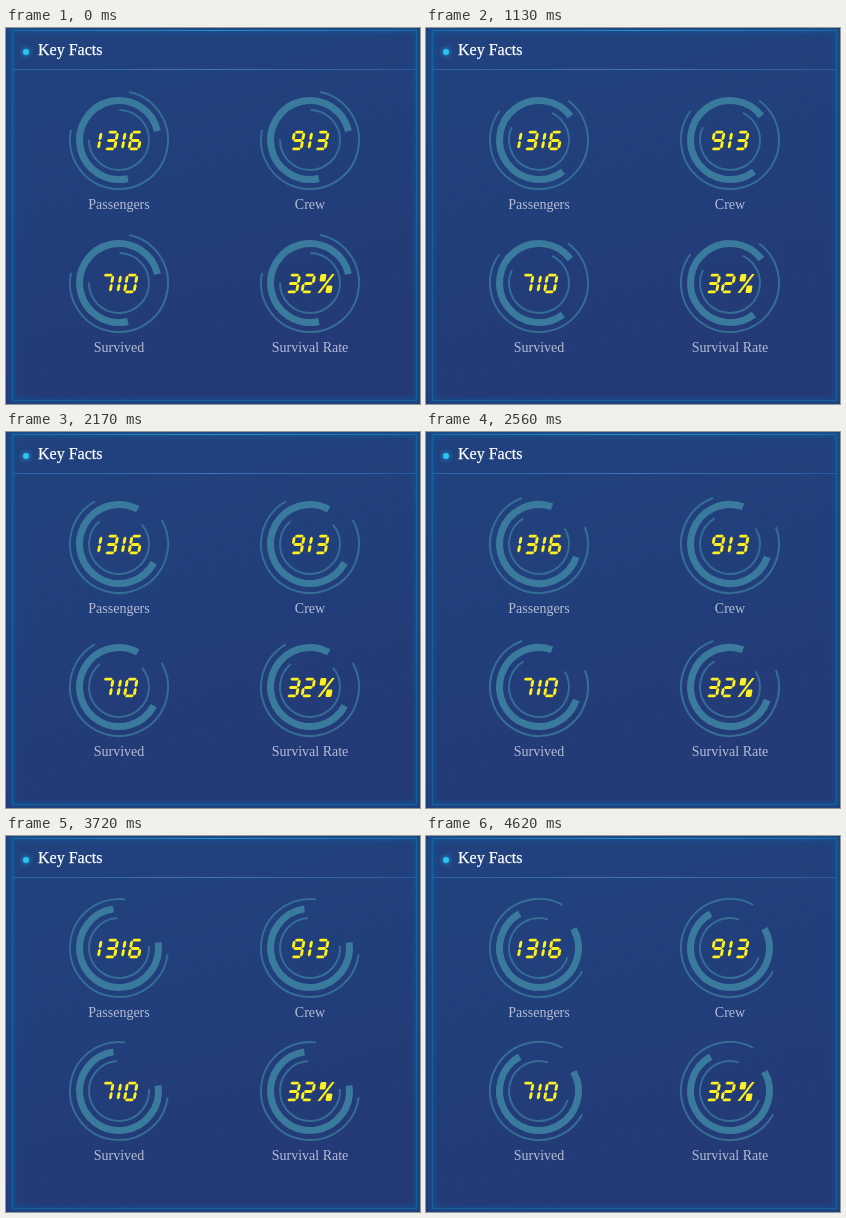
These frames come from a looping animation (414x376 px, 5.68 s). An HTML page:

```html
<!DOCTYPE html>
<html lang="en">
<head>
<meta charset="utf-8">
<title>Key Facts</title>
<style>
html, body { margin: 0; width: 100%; height: 100%; overflow: hidden; background: #213f7c; }
svg { display: block; width: 414px; height: 376px; font-family: "Liberation Serif", "Times New Roman", serif; }
.ring { fill: none; stroke: #3a7a9c; }
.label { font-size: 14px; fill: #b4bcd5; text-anchor: middle; }
.digits { fill: #fff01f; }
</style>
</head>
<body>
<svg id="stage" viewBox="0 0 414 376">
  <defs>
    <linearGradient id="bg" x1="0" y1="0" x2="0.3" y2="1">
      <stop offset="0" stop-color="#21427f"/>
      <stop offset="0.5" stop-color="#213f7b"/>
      <stop offset="1" stop-color="#243a76"/>
    </linearGradient>
    <linearGradient id="line">
      <stop offset="0" stop-color="#2a62a8"/>
      <stop offset="0.5" stop-color="#3f74b8"/>
      <stop offset="1" stop-color="#2a5aa2"/>
    </linearGradient>
    <linearGradient id="top">
      <stop offset="0" stop-color="#1b6aa6"/>
      <stop offset="0.5" stop-color="#2f8fc0"/>
      <stop offset="1" stop-color="#1b6aa6"/>
    </linearGradient>
    <filter id="soft" x="-20%" y="-20%" width="140%" height="140%"><feGaussianBlur stdDeviation="2.2"/></filter>
  </defs>
  <rect width="414" height="376" fill="url(#bg)"/>
  <rect x="6.5" y="2.5" width="404" height="370" fill="none" stroke="#0e6cae" stroke-opacity=".45" stroke-width="4" filter="url(#soft)"/>
  <rect x="6.5" y="2.5" width="404" height="370" fill="none" stroke="#17609f"/>
  <rect x="6" y="2" width="405" height="1" fill="url(#top)"/>
  <rect x="7" y="41" width="403" height="1" fill="url(#line)"/>
  <circle cx="20" cy="24" r="4.5" fill="#1fa8e0" opacity=".5" filter="url(#soft)"/>
  <circle cx="20" cy="24" r="3" fill="#2cc6f0"/>
  <text x="32" y="27" font-size="16" fill="#fff" stroke="#fff" stroke-width=".25">Key Facts</text>
</svg>
<script>
const stage = document.getElementById("stage");
const LOOP = 5680, LAST = 35, TURN = 3.04;

const facts = [
  [113, 112, "1316", "Passengers"],
  [304, 112, "913", "Crew"],
  [113, 255, "710", "Survived"],
  [304, 255, "32%", "Survival Rate"]
];

// radius, width, angle where the arc begins (clockwise from top), direction, opacity
const rings = [
  [49, 2, 12, 1, .8],
  [39.5, 7, 167, -1, 1],
  [30, 2, 1, 1, .8]
];

// segments a-g: top, upper right, lower right, bottom, lower left, upper left, middle
const SEGMENTS = { 0: "abcdef", 1: "bc", 2: "abged", 3: "abgcd", 6: "acdefg", 7: "abc", 9: "abcdfg" };
const L = 1.7, R = 11.3, T = -8.4, B = 8.4;
const ENDS = {
  a: [L, T, R, T], b: [R, T, R, 0], c: [R, 0, R, B], d: [L, B, R, B],
  e: [L, 0, L, B], f: [L, T, L, 0], g: [L, 0, R, 0]
};

function add(parent, name, attrs, text) {
  const el = document.createElementNS("http://www.w3.org/2000/svg", name);
  for (const key in attrs) el.setAttribute(key, attrs[key]);
  if (text) el.textContent = text;
  return parent.appendChild(el);
}

function bar(x1, y1, x2, y2) {
  const w = 1.45, g = .35, k = w + g;
  return y1 === y2
    ? `M${x1 + g} ${y1}l${w} ${-w}H${x2 - k}l${w} ${w}l${-w} ${w}H${x1 + k}z`
    : `M${x1} ${y1 + g}l${w} ${w}V${y2 - k}l${-w} ${w}l${-w} ${-w}V${y1 + k}z`;
}

function glyph(ch) {
  if (ch === "%") {
    return "M13.6 -9.6h2.6L5 9.6H2.4z" +
      "M3.2 -9.4h4l1 1v5.4l-1 1h-4l-1 -1v-5.4z" +
      "M11.2 2h4l1 1v5.4l-1 1h-4l-1 -1v-5.4z";
  }
  return [...SEGMENTS[ch]].map(s => bar(...ENDS[s])).join("");
}

const advance = ch => ch === "1" ? 9 : ch === "%" ? 18 : 15;

function number(parent, text) {
  const box = add(parent, "g", { class: "digits", transform: "translate(0 .5) skewX(-10)" });
  let x = -[...text].reduce((sum, ch) => sum + advance(ch), 0) / 2;
  for (const ch of text) {
    const shift = ch === "1" ? x - 6.5 : x + .8;
    add(box, "path", { d: glyph(ch), transform: `translate(${shift} 0)` });
    x += advance(ch);
  }
}

function arc(r, from) {
  const at = deg => {
    const a = deg * Math.PI / 180;
    return `${r * Math.sin(a)} ${-r * Math.cos(a)}`;
  };
  return `M${at(from)}A${r} ${r} 0 1 1 ${at(from + 270)}`;
}

const spinning = [];
for (const [x, y, value, label] of facts) {
  const g = add(stage, "g", { transform: `translate(${x} ${y})` });
  for (const [r, width, from, dir, opacity] of rings) {
    const el = add(g, "path", { class: "ring", d: arc(r, from), "stroke-width": width, opacity });
    spinning.push([el, dir]);
  }
  number(g, value);
  add(g, "text", { class: "label", y: 69 }, label);
}

// steps are 130 ms apart, three of them 10 ms shorter
const startOf = n => 100 + 130 * n - 10 * ((n > 7) + (n > 27) + (n > 30));

function draw(now) {
  const t = now % LOOP;
  let step = 0;
  while (step < LAST && t >= startOf(step + 1)) step++;
  for (const [el, dir] of spinning) el.setAttribute("transform", `rotate(${dir * step * TURN})`);
}

const begin = performance.now();
function frame() {
  draw(performance.now() - begin);
  requestAnimationFrame(frame);
}
draw(0);
requestAnimationFrame(frame);
</script>
</body>
</html>
```
